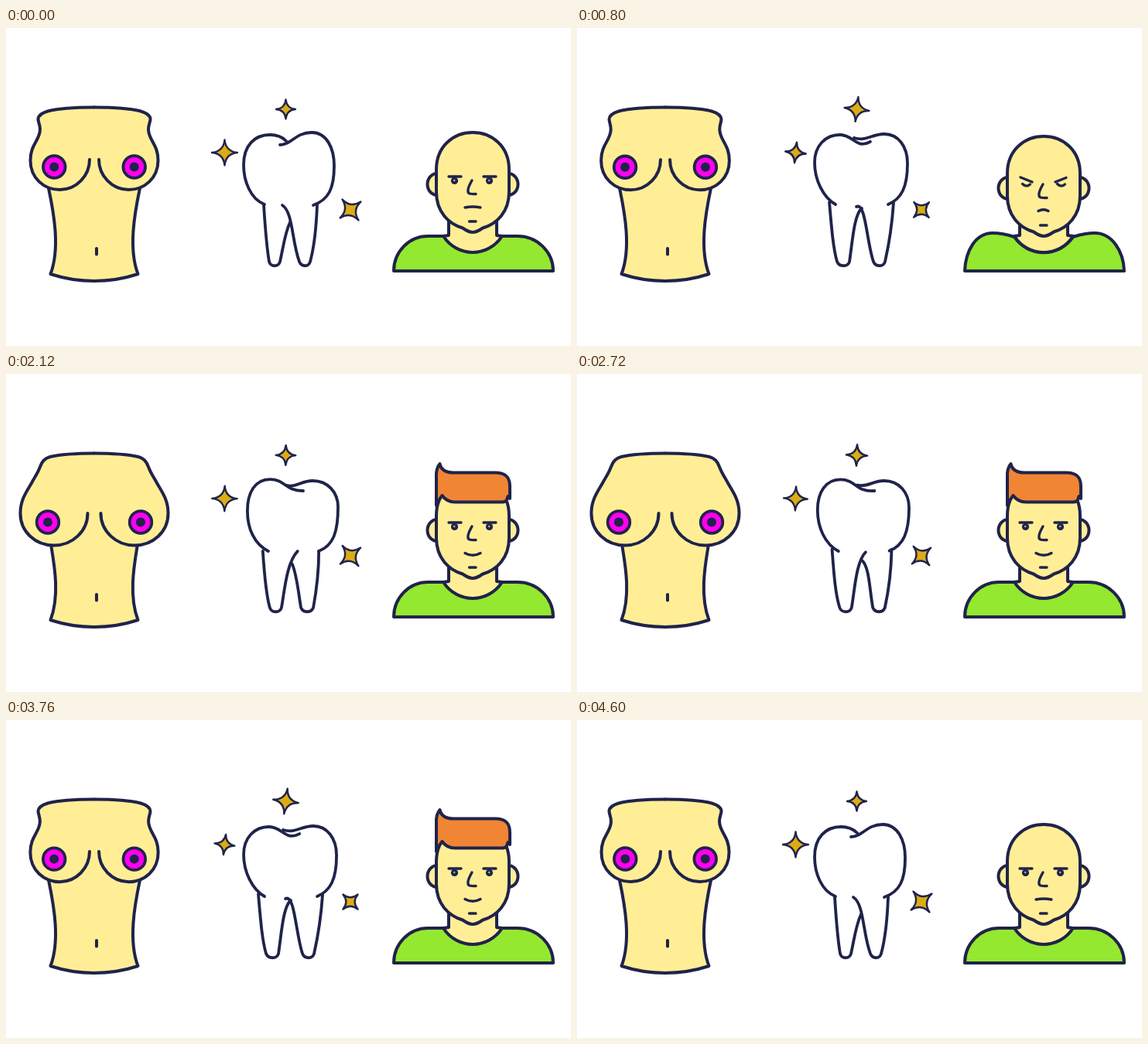
Animation, 730 px wide and 411 px high, one loop 4640 ms. Source, as an HTML page with a canvas:

```html
<!DOCTYPE html>
<html>
<head>
<meta charset="utf-8">
<style>
html, body { margin: 0; height: 100%; overflow: hidden; background: #fff; }
canvas { display: block; }
</style>
</head>
<body>
<canvas id="stage" width="730" height="411"></canvas>
<script>
const ctx = document.getElementById('stage').getContext('2d');
const LOOP = 4640, INK = '#20234a', SKIN = '#ffee96', PINK = '#ff00f0';
const GREEN = '#94e82f', HAIR = '#f08534', GOLD = '#dcac14';

const lerp = (a, b, k) => a + (b - a) * k;
// smooth 0..1 ramp between two times
const ramp = (t, from, to) => {
  const k = Math.min(1, Math.max(0, (t - from) / (to - from)));
  return k * k * (3 - 2 * k);
};
// blend two path strings with the same commands
const mix = (a, b, k) => {
  const target = b.match(/-?[\d.]+/g);
  let i = 0;
  return a.replace(/-?[\d.]+/g, n => lerp(+n, +target[i++], k).toFixed(2));
};

function draw(d, fill, width = 4) {
  const path = new Path2D(d);
  if (fill) { ctx.fillStyle = fill; ctx.fill(path); }
  if (width) { ctx.lineWidth = width; ctx.stroke(path); }
}

function dot(x, y, r, fill, width = 0) {
  ctx.beginPath();
  ctx.arc(x, y, r, 0, 7);
  ctx.fillStyle = fill;
  ctx.fill();
  if (width) { ctx.lineWidth = width; ctx.stroke(); }
}

const CHEST = [
  'M114 102.5C95 102.5 68 104 54 107.5C46 110 41.5 113 41.5 118C42 123 44 125 44 131C44 145 31.5 150 31.5 171C31.5 194 49 209 69.5 209C91 209 108 191 108 170',
  'M114 102.5C95 102.5 70 104 57 107C49 109 46 114 44 120C41 128 38 132 33 141C26 153 18.5 163 18.5 180C18.5 204 38 221.5 62 221.5C86 221.5 105.5 203 105.5 180'
];
const BELLY = [
  'M55 207C62 240 70 285 57.5 318Q85 327 114 327',
  'M58 220C62 245 70 285 57.5 318Q85 327 114 327'
];

function mirrored(part) {
  part();
  ctx.save();
  ctx.translate(228, 0);
  ctx.scale(-1, 1);
  part();
  ctx.restore();
}

function torso(t) {
  const k = ramp(t, 700, 1750) - ramp(t, 2840, 3820);
  const belly = mix(...BELLY, k), chest = mix(...CHEST, k);
  mirrored(() => {
    draw(belly + 'V104', SKIN, 0);
    draw(belly);
  });
  mirrored(() => {
    draw(chest, SKIN);
    const x = lerp(62.3, 54, k), y = lerp(179.5, 191.5, k);
    dot(x, y, 14.3, PINK, 3.8);
    dot(x, y, 6, INK);
  });
  draw('M117 285V292.5');
}

// each part of the tooth, turned from left to right
const TURNS = [-1, -0.43, 0.53, 1], TURNED = 2240;
const CROWN_LEFT = [
  'M334 228C316 221 307 198 307 177C307 152 321 138 341 138C350 138 357 141 362 146',
  'M334 228C318 219 307 196 307 174C307 152 321 138 340 138C357 138 361 157 379 147',
  'M336 229C320 220 309 196 309 174C309 152 321 137 339 137C361 137 360 156 385 151',
  'M339 229C321 220 312 200 312 177C312 153 322 136 341 136C361 136 360 151 384 151'
];
const CROWN_RIGHT = [
  'M354 151C369 151 374 135 395 135C414 135 424 155 424 178C424 207 417 222 397 229',
  'M358 142C373 147 381 137 397 137C415 137 427 153 427 175C427 206 419 221 402 228',
  'M361 143C376 146 383 138 398 138C416 138 429 153 429 174C429 205 420 221 403 228',
  'M362 144C376 147 381 138 396 138C416 138 429 153 429 172C429 204 423 222 404 229'
];
const ROOT_LEFT = [
  'M333 229C335 260 337 285 340 302C342 309 352 309 354 302C358 285 360 266 367 251',
  'M326 225C329 260 331 285 336 302C339 309 350 309 352 302C356 275 358 241 368 233',
  'M326 223C329 260 331 285 337 302C340 309 351 309 353 302C357 278 357 242 367 232',
  'M332 229C334 260 336 285 341 302C343 309 354 309 356 302C360 280 363 243 377 229'
];
const ROOT_RIGHT = [
  'M357 229C371 238 369 275 379 302C382 309 391 309 393 302C399 280 401 255 402 229',
  'M361 231C373 225 374 275 383 302C386 309 396 309 398 302C403 280 407 255 409 226',
  'M365 233C380 228 378 270 384 302C387 309 397 309 399 302C405 280 409 255 410 223',
  'M370 246C376 262 378 285 381 302C384 309 394 309 397 302C401 280 404 255 404 229'
];

function tooth(t) {
  const phase = t < TURNED ? t / TURNED : (LOOP - t) / (LOOP - TURNED);
  const turn = -Math.cos(phase * Math.PI);
  const i = turn < TURNS[1] ? 0 : turn < TURNS[2] ? 1 : 2;
  const k = (turn - TURNS[i]) / (TURNS[i + 1] - TURNS[i]);
  for (const part of [ROOT_LEFT, ROOT_RIGHT, CROWN_LEFT, CROWN_RIGHT])
    draw(mix(part[i], part[i + 1], k), null, 3.8);
}

function star(x, y, r, degrees) {
  const q = r * 0.09;
  ctx.save();
  ctx.translate(x, y);
  ctx.rotate(degrees * Math.PI / 180);
  draw(`M0 ${-r}Q${q} ${-q} ${r} 0Q${q} ${q} 0 ${r}Q${-q} ${q} ${-r} 0Q${-q} ${-q} 0 ${-r}Z`, GOLD, 2.4);
  ctx.restore();
}

function stars(t) {
  const k = (1 - Math.cos(t / LOOP * 4 * Math.PI)) / 2;
  star(361.5, 105, lerp(12.5, 17, k), lerp(0, 9, k));
  star(282.5, 161, lerp(16.5, 12.5, k), lerp(0, 8, k));
  star(445, 235, lerp(17, 13, k), lerp(-38, -46, k));
}

const SHIRT = [
  'M501 314C501 289 521 269 545 269C552 269 558 269 565 269C583 297 623 297 641 269C648 269 654 269 661 269C686 269 707 289 707 314Z',
  'M501 314C502 288 515 265 537 265C548 265 556 267 565 270C583 297 623 297 641 270C650 267 658 265 669 265C691 265 706 288 707 314Z'
];
const BROWS = ['M572 192L588 192M617 192L633 192', 'M573 193L588 199M618 199L632 193.5'];
const MOUTH_SAD = ['M593 232Q603 230 613 232', 'M596 231.5Q603 228 609 231.5'];
const MOUTH_HAPPY = 'M593 231.5Q603 237 613 231.5';

function man(t) {
  const down = ramp(t, 60, 700) - ramp(t, 1580, 2000);
  const hair = ramp(t, 1760, 2020) - ramp(t, 4080, 4380);
  draw('M572 245V268L565 269C583 297 623 297 641 269L634 268V245', SKIN);
  draw(mix(...SHIRT, down), GREEN);

  draw(mix(...BROWS, down), null, 0);
  ctx.save();
  ctx.translate(0, 5 * down);
  for (const x of [557, 649]) {
    ctx.beginPath();
    ctx.ellipse(x, 202, 12.5, 14, 0, 0, 7);
    ctx.fillStyle = SKIN;
    ctx.fill();
    ctx.lineWidth = 4;
    ctx.stroke();
  }
  draw('M556 183C556 153 578 135 603 135S650 153 650 183V212C650 238 634 253 616 258.5C611 262 607 264 603 264C599 264 595 262 590 258.5C572 253 556 238 556 212Z', SKIN);
  ctx.translate(0, -5 * down);
  draw(mix(...BROWS, down), null, 3.4);
  ctx.translate(0, 5 * down);

  for (const x of [579.5, 624.5]) {
    if (down > 0.5) {
      draw(`M${x - 4} 196.5Q${x + 1} 201.5 ${x + 6} 197`, null, 3.2);
    } else {
      dot(x, 197.5, 4.6, INK);
      dot(x - 0.3, 197, 1.3, '#b3ab88');
    }
  }
  draw('M602 197C598 204 595 211 598 213.5Q600 215 607 214.5', null, 3.4);
  draw(mix(mix(...MOUTH_SAD, down), MOUTH_HAPPY, hair), null, 3.4);
  draw('M598.5 250H607', null, 3.4);

  if (hair > 0.01) {
    ctx.translate(0, 166);
    ctx.scale(1, hair);
    ctx.translate(0, -166);
    draw('M556 170V134C555.5 126 557 120 560.5 116C562 123 568 127.5 578 127.5H632C646 127.5 651 134 651 145V161L648.5 158C647 164 646 165.5 640 165.5H580C572 165.5 567 162 563.5 157C561 160 558 165 556 170Z', HAIR);
  }
  ctx.restore();
}

function frame() {
  const t = performance.now() % LOOP;
  ctx.fillStyle = '#fff';
  ctx.fillRect(0, 0, 730, 411);
  ctx.strokeStyle = INK;
  ctx.lineCap = ctx.lineJoin = 'round';
  torso(t);
  tooth(t);
  stars(t);
  man(t);
  requestAnimationFrame(frame);
}
frame();
</script>
</body>
</html>
```
